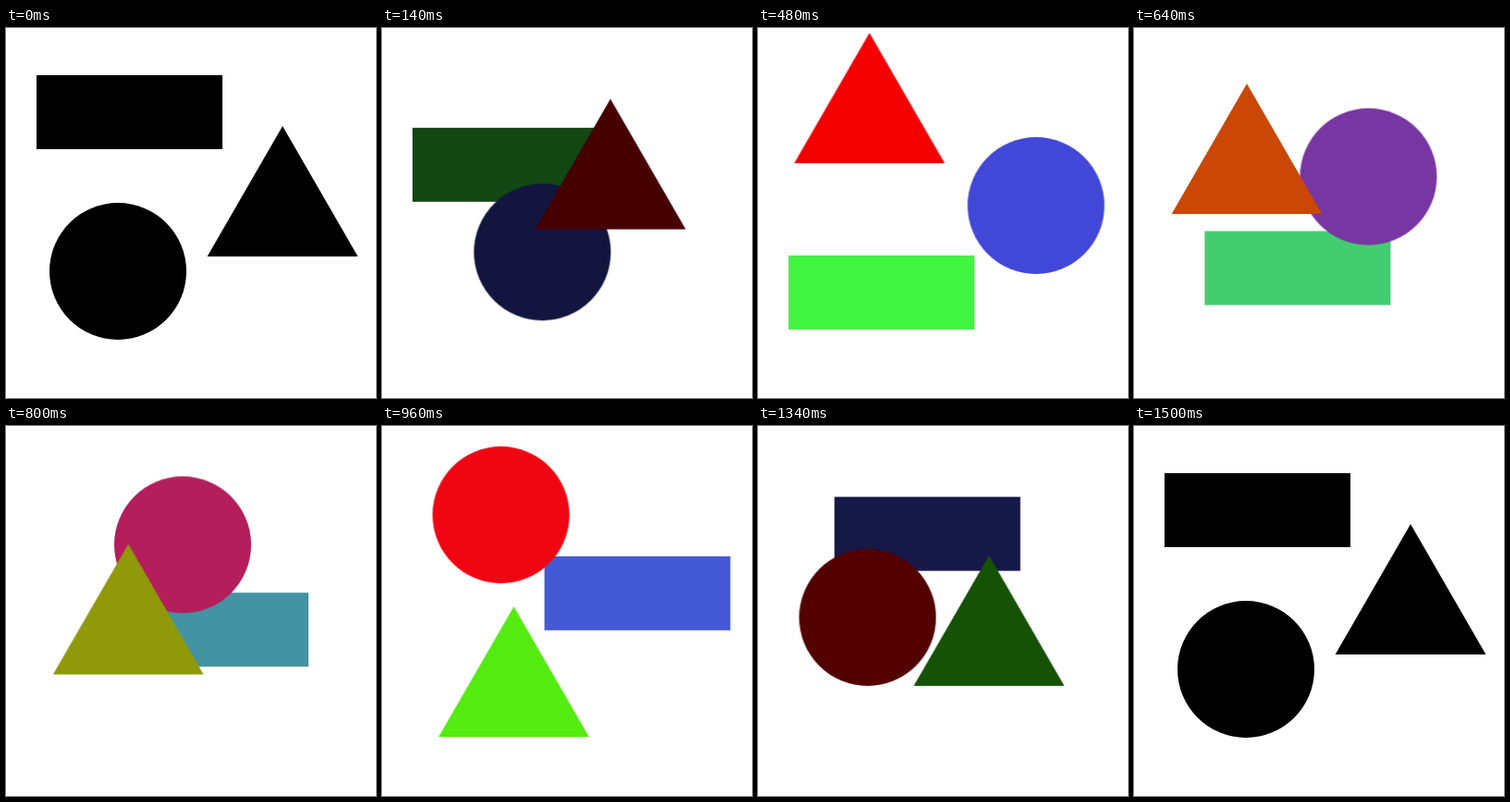
Write an HTML page that moves like this. It is 400 by 400 pixels and loops after 1.52 s.

```html
<!DOCTYPE html>
<html lang="en">
<head>
<meta charset="utf-8">
<title>Three shapes trading places</title>
<style>
  html, body {
    margin: 0;
    width: 100%;
    height: 100%;
    overflow: hidden;
    background: #fff;
  }
  svg {
    display: block;
    width: 100vw;
    height: 100vh;
  }

  /* Each shape visits three points; 25 poses of 20 ms per leg, then a 20 ms rest.
     The small negative delay keeps poses clear of the step boundaries. */
  .shape {
    animation: tour 1520ms steps(25, end) -1ms infinite;
  }
  @keyframes tour {
    0%       { transform: var(--a); fill: #000; }
    32.8947% { transform: var(--b); fill: var(--fill-b); }
    65.7895% { transform: var(--c); fill: var(--fill-c); }
    98.6842%, 100% { transform: var(--a); fill: #000; }
  }

  .bar {
    --a: translate(33px, 51px);
    --b: translate(33px, 254px);
    --c: translate(188px, 131px);
    --fill-b: #44ff44;
    --fill-c: #444be1;
  }
  .disc {
    --a: translate(121px, 263px);
    --b: translate(308px, 189px);
    --c: translate(113px, 88px);
    --fill-b: #444be1;
    --fill-c: #ff0000;
  }
  .tri {
    --a: translate(299px, 106px);
    --b: translate(113px, 1px);
    --c: translate(145px, 212px);
    --fill-b: #ff0000;
    --fill-c: #44ff11;
  }
</style>
</head>
<body>
<svg viewBox="0 0 400 400">
  <rect class="shape bar" width="201" height="80"/>
  <circle class="shape disc" r="74"/>
  <path class="shape tri" d="M0 0L81.4 141H-81.4Z"/>
</svg>
</body>
</html>
```
